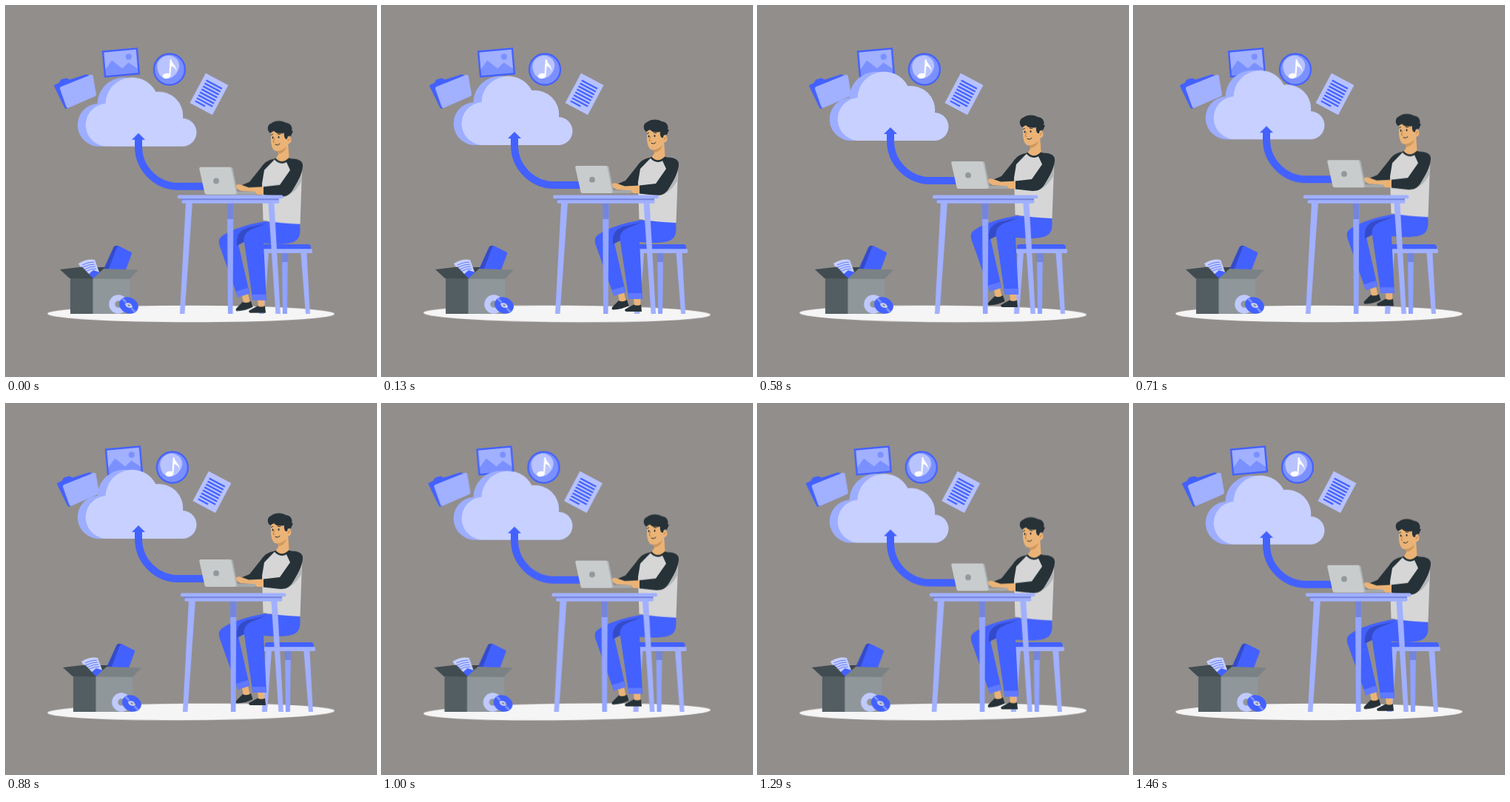
Write an HTML page without scripts that moves like this. It is 500 px wide and 500 px high and loops after 1500 ms.

```html
<!DOCTYPE html>
<html lang="en">
<head>
<meta charset="utf-8">
<title>Cloud upload</title>
<style>
  html, body { margin: 0; width: 100%; height: 100%; overflow: hidden; background: #928e8c; }
  svg { display: block; width: 100vw; height: 100vh; }

  .float, .shake, .wind { animation: 1.5s linear -22ms infinite; }
  .float { animation-name: float; }
  .shake { animation-name: shake; }
  .wind { animation-name: wind; transform-box: fill-box; transform-origin: center; }

  @keyframes float { 50% { transform: translateY(-10px); } }
  @keyframes shake {
    10%, 90% { transform: translateX(-1px); }
    20%, 80% { transform: translateX(2px); }
    30%, 50%, 70% { transform: translateX(-4px); }
    40%, 60% { transform: translateX(4px); }
  }
  @keyframes wind {
    25% { transform: rotate(1deg); }
    75% { transform: rotate(-1deg); }
  }

  .blue { fill: #4361ff; }
  .mid { fill: #7b90ff; }
  .light { fill: #a1b0ff; }
  .pale { fill: #c7d0ff; }
  .shade { fill: #7485dc; }
  .navy { fill: #344bc9; }
  .dark { fill: #263238; }
  .skin { fill: #ebb376; }
  .line { fill: none; stroke: #4361ff; }
  .ink { fill: none; stroke: #263238; stroke-linecap: round; }
</style>
</head>
<body>
<svg viewBox="0 0 500 500">
  <defs>
    <path id="cloud" d="M139 190A29 29 0 0 1 134.500 132A36 36 0 0 1 202.500 116.300A32.500 32.500 0 0 1 239 152A19 19 0 0 1 238 190Z"/>
  </defs>

  <ellipse class="wind" cx="250" cy="416" rx="194" ry="11.300" fill="#f5f5f5"/>

  <!-- Files -->
  <g class="shake">
    <g id="folder">
      <path class="blue" d="M65.500 109Q64.500 107 67 106L71.500 104L73.500 100.500Q74 99.500 75.500 99L82 97.500L86 99.500L108 92.500Q111 92 112 94L120 121L82 138.500Q80 139.500 79 137Z"/>
      <path class="light" d="M73 112Q72.500 110 74.500 109L114.500 93Q117 92 117.700 94.500L122 119Q122.300 121 120.500 122L85 137.500Q82.500 138.500 81.500 136Z"/>
    </g>
    <g transform="translate(155.500 76.500) rotate(-5)">
      <rect class="light" x="-23" y="-17" width="46" height="34"/>
      <path class="mid" d="M-23 9L-12 -4L1 8L10 1L23 11V17H-23Z"/>
      <circle class="mid" cx="11" cy="-7" r="4"/>
      <rect class="line" x="-23" y="-17" width="46" height="34" stroke-width="2.400"/>
    </g>
    <g>
      <circle class="mid line" cx="221" cy="85.700" r="21" stroke-width="2.200" style="fill:#7b90ff"/>
      <path fill="#b9c4ff" d="M205 86C202 76 210 67 220 67C229 67 236 75 234 83C232 92 224 99 216 98C210 97 206 92 205 86Z"/>
      <ellipse cx="217" cy="94.500" rx="5.300" ry="3.600" fill="#fff" transform="rotate(-8 217 94.500)"/>
      <path d="M220.300 95L221.800 72H223.500C224 78 231 80 230.500 89C229 83 226 82 223.600 81L222.300 95Z" fill="#fff"/>
    </g>
    <g transform="translate(274.500 119) rotate(28)">
      <rect x="-17.300" y="-22.800" width="34.600" height="45.600" fill="#b7c2ff"/>
      <path class="line" stroke-width="2.200" d="M-12 -14.500H12M-12 -10H12M-12 -5.500H12M-12 -1H12M-12 3.500H12M-12 8H12M-12 12.500H12M-12 17H3"/>
    </g>
  </g>

  <!-- Cloud and cable -->
  <g class="float">
    <use href="#cloud" x="-11" fill="#9dadff"/>
    <use href="#cloud" class="pale"/>
    <path class="line" stroke-width="10" d="M179 179V190A54 54 0 0 0 233 244H272"/>
    <path class="blue" d="M170 181L179 172L188 181Z"/>
  </g>

  <!-- Box -->
  <g class="shake">
    <path fill="#3b464b" d="M87 368L103 353H155L167 369Z"/>
    <path class="pale" d="M98 348Q110 341 120 343L127 362H106Z"/>
    <path class="line" stroke-width=".8" d="M103 350Q111 346 119 346M104 353Q112 349 120 349M106 356Q113 352 121 352M107 359Q114 355 122 355"/>
    <path class="blue" d="M110 364L118 357L130 361L120 369Z"/>
    <path class="navy" d="M131 358L145 327Q147 323 151 324L155 326L140 362Z"/>
    <path class="blue" d="M137 360L150 326Q151 324 153 324.500L169 332.500Q171 333.500 170 335L160 362Z"/>
    <path fill="#535e63" d="M87 368H118V416H87Z"/>
    <path fill="#90979b" d="M117.500 368H167.500V416H117.500Z"/>
    <path fill="#414c51" d="M73 356L103 352.500L118 368.500L86 368Z"/>
    <path fill="#7b8285" d="M117.500 368.500L132 355L179 356.500L167 369Z"/>
    <circle cx="152" cy="403" r="8.700" fill="none" stroke="#c0caff" stroke-width="8"/>
    <g transform="translate(166 404.500) rotate(25)">
      <ellipse class="line" rx="9.300" ry="6.800" stroke-width="8"/>
      <path d="M-5 -2L-12 -5M5 2L12 5" stroke="#7b90ff" stroke-width="3"/>
      <ellipse rx="3" ry="2.200" fill="none" stroke="#c7d0ff" stroke-width="1.500"/>
    </g>
  </g>

  <!-- Stool -->
  <g class="shake">
    <path class="light" d="M347 334H355L349 416H342ZM398.500 334H406.500L411 416H405Z"/>
    <path fill="#8fa2ff" d="M373 334H381L380 416H374Z"/>
    <path class="shade" d="M372.500 334H381.500V346H373Z"/>
    <rect class="blue" x="346" y="322" width="66" height="9" rx="4"/>
    <rect class="light" x="344" y="328.300" width="70" height="5.700" rx="1.500"/>
  </g>

  <!-- Person -->
  <g class="float">
    <path class="skin" d="M319 391L327 389L330 402L321 403ZM340 396H349L349.500 408H341Z"/>
    <path class="dark" d="M320 400Q325 403 331 399L333.500 407Q324 412 312 412.500Q309 411 312 408ZM340 405.500Q345 408 350 405.500L351 415H330Q326 413 330 411Z"/>

    <path class="blue" d="M352 291C326 295 299 304 290 313C286 317 288 323 290 328L313 393L329 388L314 322L365 300Z"/>
    <path class="navy" d="M312 324C311 312 314 304 326 300L352 294L362 302L324 318Z"/>
    <path class="blue" d="M397 292C398 306 399 316 386 320C374 323 362 322 348 321L352 397.500H333.500L322 320C320 308 327 303 340 299L358 291Z"/>
    <path fill="#6079ff" d="M310.500 386L327 381L329 389L313 394ZM332.500 390H351.700V398H333.700Z"/>

    <path class="dark" d="M364 206.500C354 208 349 212 345 218L329 238L317 243L322 250L343 248L360 226Z"/>
    <path fill="#d6d6d6" d="M364 206.500Q374 210 383 206.500L395 212L400 224L397.500 295Q370 294 347.500 290L346 240L349 222Z"/>
    <path fill="#b3b6b7" d="M400 222L399 238C394 247 387 254 377 258L390 240Z"/>
    <path class="skin" d="M310.500 246C310 242 313 240 318 242L328 245.500L349 244.500V255H340L332 251L317 250Z"/>
    <path class="dark" d="M383 206.500C394 206 402 209 401 217C400 228 394 238 388 248C384 255 379 258 371 258L348 255.500V244.500L370 242L384 222L378 209Z"/>
    <path class="dark" d="M362 207Q373 219 385 206.500L382 205.500Q373 213 365 205.500Z"/>

    <path class="skin" d="M367 192L381 184L382.500 205Q373 215 364.500 206L368 201Z"/>
    <path fill="#cf965c" d="M368 196Q375 195 379 190Q377 199 368 200Z"/>
    <path class="skin" d="M358.500 170Q357 181 359 189Q361 197 367 196.500Q376 195 379 187Q386 187 385.500 180Q384 175 380 177L378 167Z"/>
    <path class="dark" d="M357 172C352 168 353 161 358 159C364 154 374 155 378 158C384 158 388 164 386 169L388 169L385 176Q380 175 380 180H378Q375 177 376 172Q366 174 362 169Z"/>
    <ellipse class="dark" cx="360.500" cy="178" rx="1" ry="1.500"/>
    <ellipse class="dark" cx="368.500" cy="177.500" rx="1" ry="1.500"/>
    <path class="ink" stroke-width="1" d="M358.500 174.500L360.500 173.500M367 173L370.500 173.500M364 187.500Q367.500 189.500 370 186.500"/>
    <path fill="none" stroke="#b97c44" stroke-width=".9" d="M363 178L361 184L363.500 184.500M381 183Q382 179 384 180"/>
  </g>

  <!-- Laptop -->
  <g class="float">
    <path fill="#a5a8a8" d="M310 251H337Q338 255 336 255H310Z"/>
    <path fill="#aeb3b5" d="M263 218H304Q306 218 306.500 220L313 253Q313 255 311 255H272Z"/>
    <path fill="#c8cccd" d="M263 218H302Q304 218 304.400 220L311 253Q311.300 255 309 255H271Q269 255 268.500 253L261.200 220Q261 218 263 218Z"/>
    <circle cx="284" cy="236.700" r="3.900" fill="#92989b"/>
  </g>

  <!-- Table -->
  <g class="shake">
    <path class="light" d="M243 266H252L241.500 416H235ZM354.500 266H362.500L371 416H364.500Z"/>
    <path fill="#94a6ff" d="M299 266H307.500L306.500 416H300Z"/>
    <path class="shade" d="M299 266H307.500L307.300 288H299.300Z"/>
    <rect class="shade" x="237" y="259" width="132" height="5"/>
    <rect class="light" x="232" y="255.500" width="142.500" height="4.700" rx="2"/>
    <rect class="light" x="237.500" y="262.300" width="132" height="4.400" rx="1.800"/>
  </g>
</svg>
</body>
</html>
```
